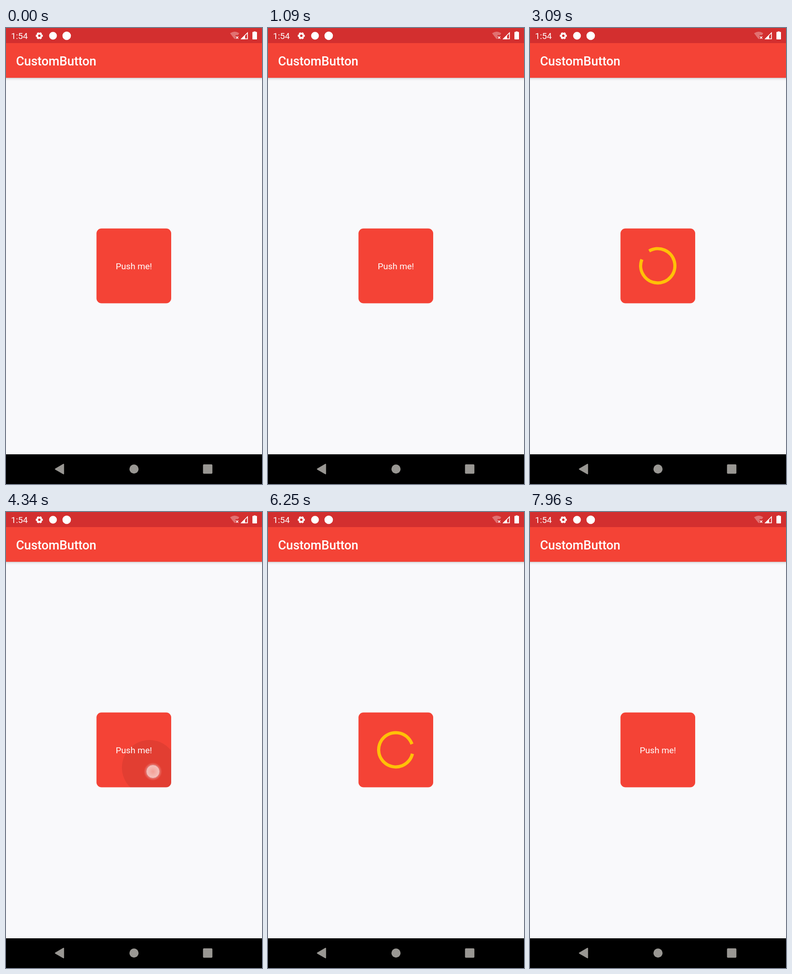
These frames come from a looping animation (561x998 px, 8 s). An HTML page:

```html
<!DOCTYPE html>
<html lang="en">
<head>
<meta charset="utf-8">
<title>CustomButton</title>
<style>
  html, body { margin: 0; width: 100%; height: 100%; overflow: hidden; background: #f9f9fb; }
  svg { display: block; width: 100vw; height: 100vh; }
  text { font-family: Roboto, sans-serif; fill: #fff; }
</style>
</head>
<body>
<svg viewBox="0 0 561 998" preserveAspectRatio="none">
  <defs>
    <linearGradient id="shadow" x2="0" y2="1">
      <stop offset="0" stop-color="#000" stop-opacity=".17"/>
      <stop offset=".4" stop-color="#000" stop-opacity=".05"/>
      <stop offset="1" stop-color="#000" stop-opacity="0"/>
    </linearGradient>
    <radialGradient id="touchFill">
      <stop offset="0" stop-color="#f4a39a"/>
      <stop offset="1" stop-color="#f7c6c2"/>
    </radialGradient>
    <radialGradient id="touchGlow">
      <stop offset=".72" stop-color="#fff" stop-opacity=".28"/>
      <stop offset="1" stop-color="#fff" stop-opacity="0"/>
    </radialGradient>
    <clipPath id="buttonShape"><rect x="198.3" y="438.7" width="163.7" height="163.7" rx="11"/></clipPath>
  </defs>

  <rect width="561" height="998" fill="#f9f9fb"/>
  <rect y="109" width="561" height="7" fill="url(#shadow)"/>
  <rect y="32" width="561" height="77" fill="#f44336"/>
  <rect width="561" height="33" fill="#d32f2f"/>
  <rect y="933" width="561" height="65"/>

  <text x="11" y="24" font-size="19.1">1:54</text>
  <text x="22" y="81.5" font-size="27.3" font-weight="500">CustomButton</text>

  <!-- status bar icons -->
  <g fill="#fff">
    <g transform="translate(73 17)">
      <circle r="4.6" fill="none" stroke="#fff" stroke-width="3.6"/>
      <path d="M-7.6 0H-5M5 0H7.6M-3.8-6.6L-2.7-4.7M3.8-6.6L2.7-4.7M-3.8 6.6L-2.7 4.7M3.8 6.6L2.7 4.7" stroke="#fff" stroke-width="4.4"/>
    </g>
    <circle cx="103" cy="17" r="8.5"/>
    <circle cx="133" cy="17" r="9.3"/>
    <path d="M491 11.5Q501 4.500 511 11.500L508.500 15.500H503V22.500L501 24.500Z" opacity=".32"/>
    <path d="M504 18.500L509 23.500M509 18.500L504 23.500" stroke="#fff" stroke-width="1.600"/>
    <path d="M516 23.700H529.200V10.500Z" fill="none" stroke="#fff" stroke-width="1.700"/>
    <path d="M514.500 24.500L524 15V24.500Z"/>
    <path d="M543 8.500V7.500H547V8.500H549Q550 8.500 550 9.500V24Q550 25 549 25H541Q540 25 540 24V9.500Q540 8.500 541 8.500Z"/>
  </g>

  <!-- navigation bar -->
  <g fill="#999793" stroke="#999793" stroke-linejoin="round">
    <path d="M108.500 965.300L126 955V975.500Z" stroke-width="2.500"/>
    <circle cx="280.500" cy="965.300" r="10" stroke="none"/>
    <rect x="431.700" y="955" width="20.600" height="20.600" rx="2" stroke="none"/>
  </g>

  <g clip-path="url(#buttonShape)">
    <rect x="198" y="438" width="165" height="165" fill="#f44336"/>
    <circle id="ripple"/>
  </g>
  <text id="label" x="280.300" y="528" font-size="19.100" text-anchor="middle">Push me!</text>
  <path id="spinner" fill="none" stroke="#ffc107" stroke-width="7"/>
  <g id="touch">
    <circle r="20" fill="url(#touchGlow)"/>
    <circle r="14.500" fill="url(#touchFill)" stroke="#d9807f" stroke-width="1"/>
  </g>
</svg>
<script>
const LOOP = 8000, SWEEP_TIME = 900, TURN_TIME = 2000, MIN_SWEEP = 30;
const CENTER = { x: 280, y: 520.4 }, RADIUS = 37.5;

const presses = [
  { down: 1245, up: 1405, x: 322, y: 568 },
  { down: 4250, up: 4410, x: 322, y: 568 },
  { down: 6660, up: 6965, x: 337, y: 572 },
];
const loads = [
  { from: 1437, to: 3537, turn: 2 },
  { from: 4447, to: 6547, turn: 106 },
];

const [ripple, label, spinner, touch] =
  ['ripple', 'label', 'spinner', 'touch'].map(id => document.getElementById(id));
const clamp = v => Math.max(0, Math.min(1, v));
const mix = (a, b, k) => a + (b - a) * k;

function pointAt(degrees) {
  const a = degrees * Math.PI / 180;
  return `${CENTER.x + RADIUS * Math.cos(a)} ${CENTER.y + RADIUS * Math.sin(a)}`;
}

// The arc alternately shrinks from its tail and grows at its head while turning.
function drawSpinner(age, turn) {
  const cycle = Math.floor(age / SWEEP_TIME);
  const left = 1 - age % SWEEP_TIME / SWEEP_TIME;
  const eased = (360 - 2 * MIN_SWEEP) * (1 - left * left);
  const growing = cycle % 2 === 1;
  const offset = 2 * MIN_SWEEP * Math.floor((cycle + 1) / 2);
  const start = age / TURN_TIME * 360 - offset + turn + (growing ? 0 : eased);
  const sweep = growing ? eased + MIN_SWEEP : 360 - MIN_SWEEP - eased;
  spinner.setAttribute('d',
    `M${pointAt(start)}A${RADIUS} ${RADIUS} 0 ${+(sweep > 180)} 1 ${pointAt(start + sweep)}`);
}

function drawPress(press, t) {
  const grow = clamp((t - press.down) / 225);
  const eased = 1 - (1 - grow) ** 2;
  const fade = 1 - clamp((t - press.up - 80) / 250);
  ripple.setAttribute('cx', mix(press.x, CENTER.x, eased * .25 + grow ** 4 * .75));
  ripple.setAttribute('cy', mix(press.y, CENTER.y, eased * .25 + grow ** 4 * .75));
  ripple.setAttribute('r', mix(30, 120, grow ** 1.2));
  ripple.setAttribute('opacity', .075 * clamp(grow * 2.5) * fade);
  touch.setAttribute('transform', `translate(${press.x} ${press.y})`);
  touch.setAttribute('opacity', .97 * (1 - clamp((t - press.up) / 150)));
}

function show(element, visible) {
  element.style.display = visible ? '' : 'none';
}

function render() {
  const t = performance.now() % LOOP;
  const load = loads.find(l => t >= l.from && t < l.to);
  const press = presses.find(p => t >= p.down && t < p.up + 330);
  show(spinner, load);
  show(label, !load);
  show(ripple, press);
  show(touch, press);
  if (load) drawSpinner(t - load.from, load.turn);
  if (press) drawPress(press, t);
  requestAnimationFrame(render);
}
render();
</script>
</body>
</html>
```
